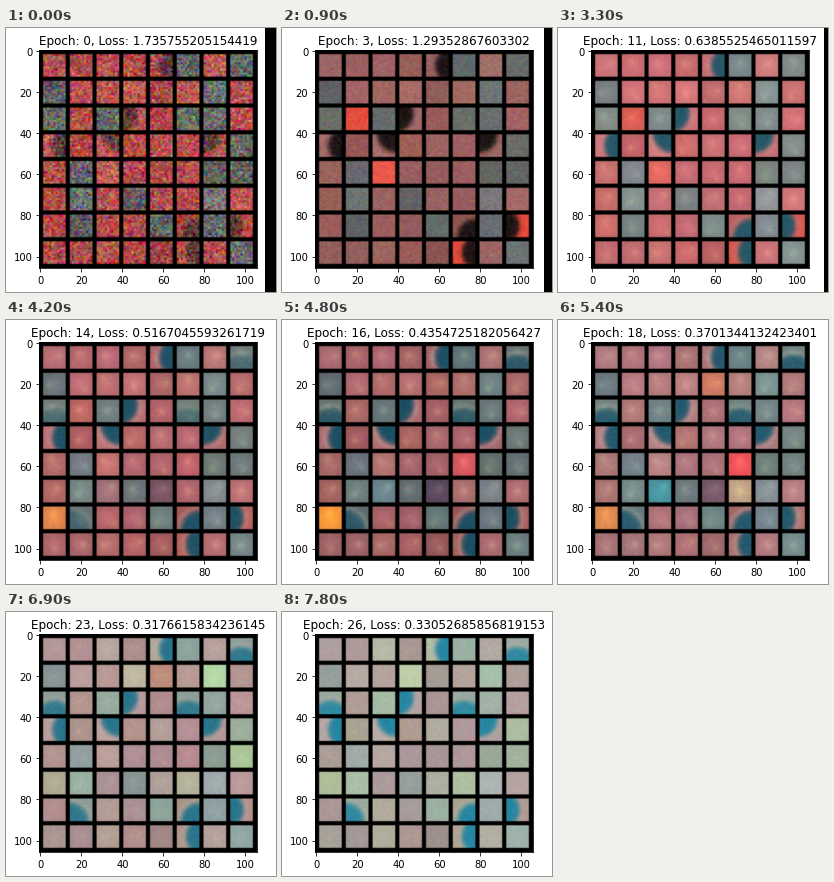
These frames come from a looping animation (270 px wide and 264 px high, 8000 ms). A matplotlib script:

```python
import numpy as np
import matplotlib.pyplot as plt
from matplotlib.animation import FuncAnimation
from matplotlib.colors import to_rgb
from matplotlib.patches import Rectangle
from matplotlib.transforms import ScaledTranslation

W, H = 270, 264
GRID, CELL, PAD = 8, 11, 2
SIZE = GRID * (CELL + PAD) + PAD

EPOCHS = [0, 3, 8, 11, 16, 20, 26]
LOSSES = [1.735755205154419, 1.29352867603302, 0.7954289317131042,
          0.6385525465011597, 0.4354725182056427, 0.3047963082790375,
          0.33052685856819153]

# Colours at each of EPOCHS; cells are named by row and column.
RED = "#b5524e #9c6360 #a06969 #cb7174 #a9686b #b88a8d #ae9c9a".split()
GRAY = "#696766 #696b6b #747b7b #838b8b #6b7779 #7f9294 #9aa6a2".split()
DARK = "#3a3030 #1e1515 #36505a #265868 #1c4f63 #2c6478 #2686a2".split()
GRAY_CELLS = "05 07 10 16 20 22 25 26 37 41 46 47 51 53 56 61 64 66 77".split()
HOT_CELLS = "21 42 67 75".split()

# Side from which a dark disc reaches into the cell, in degrees (y down).
EARLY_DISCS = {"04": 0, "23": 200, "30": 0, "32": -45, "36": -135,
               "65": 45, "67": 180, "75": 0}
LATE_DISCS = {"07": 90, "20": 90, "25": 90, "61": 135}

# Cells that flare up for a while: colour and epoch of the peak.
FLARES = {"60": ("#ffa040", 16), "54": ("#5f4a5c", 16), "45": ("#f05a5c", 18),
          "52": ("#4d98a0", 18), "14": ("#f28260", 20), "55": ("#d8c88c", 20),
          "16": ("#b0cc9c", 23), "47": ("#b0cc9c", 23)}

rng = np.random.default_rng(7)
NOISE = rng.normal(size=(GRID, GRID, CELL, CELL, 3))
TINT = rng.normal(0, 0.02, (GRID, GRID, 1)) + rng.normal(0, 0.012, (GRID, GRID, 3))
SPOT = rng.uniform(2, 8, (GRID, GRID, 2))
GREENING = rng.random((GRID, GRID)) ** 3
YY, XX = np.mgrid[:CELL, :CELL]


def blob(cx, cy, spread):
    return np.exp(-((XX - cx) ** 2 + (YY - cy) ** 2) / spread)[..., None]


def mix(cell, colour, weight):
    return cell + weight * (np.array(to_rgb(colour)) - cell)


def track_colour(track, epoch):
    channels = zip(*map(to_rgb, track))
    return np.array([np.interp(epoch, EPOCHS, c) for c in channels])


def add_disc(cell, angle, strength, epoch):
    """Blend in a dark disc with a pale rim that appears as training goes on."""
    cx, cy = (5 + 7.5 * f(np.radians(angle)) for f in (np.cos, np.sin))
    depth = (8.5 - np.hypot(XX - cx, YY - cy))[..., None]
    rim = np.exp(-(depth + 1.5) ** 2) * np.interp(epoch, [8, 16], [0, 0.3])
    cell = mix(cell, "#c8b0a4", rim * strength)
    mask = strength / (1 + np.exp(-depth / 0.6))
    return mix(cell, track_colour(DARK, epoch), mask)


def draw_cell(row, col, epoch):
    name = f"{row}{col}"
    track = GRAY if name in GRAY_CELLS else RED
    cell = np.ones((CELL, CELL, 3)) * track_colour(track, epoch)
    if name in HOT_CELLS:
        cell = mix(cell, "#ea4a40", np.interp(epoch, [0, 3, 11, 15], [0, 0.9, 0.5, 0]))
    if name in FLARES:
        colour, peak = FLARES[name]
        cell = mix(cell, colour, np.exp(-((epoch - peak) / 3) ** 2))
    cell = mix(cell, "#b4c8a4", GREENING[row, col] * np.interp(epoch, [19, 26], [0, 1]))

    # A soft glow and a yellowish spot peak around the middle of training.
    late = np.exp(-((epoch - 15) / 7) ** 2)
    cell = cell * (1 + 0.15 * late * (blob(5, 5, 20) - 0.5))
    cell += late * blob(*SPOT[row, col], 3) * np.array([0.05, 0.08, 0.03])
    cell += TINT[row, col]

    if name in EARLY_DISCS:
        strength = np.interp(epoch, [0, 2], [0.7, 1])
        cell = add_disc(cell, EARLY_DISCS[name], strength, epoch)
    elif name in LATE_DISCS:
        strength = np.interp(epoch, [11, 17], [0, 0.9])
        cell = add_disc(cell, LATE_DISCS[name], strength, epoch)
    grain = 0.015 + 0.105 * np.exp(-epoch / 1.5)
    return cell + grain * NOISE[row, col]


def draw_filters(epoch):
    image = np.zeros((SIZE, SIZE, 3))
    for row in range(GRID):
        for col in range(GRID):
            y, x = (PAD + k * (CELL + PAD) for k in (row, col))
            image[y:y + CELL, x:x + CELL] = draw_cell(row, col, epoch)
    return image.clip(0, 1)


def strip_start(epoch):
    """Left edge of the black band, which only ever shrinks."""
    return 259 if epoch < 1 else 262 if epoch < 10 else 266 if epoch < 13 else W


plt.rcParams.update({"font.family": "DejaVu Sans", "font.size": 10})
fig = plt.figure(figsize=(W / 72, H / 72), dpi=72, facecolor="white")
side = 217.44
ax = fig.add_axes([33.28 / W, 24.2 / H, side / W, side / H])
pictures = [draw_filters(epoch) for epoch in range(27)]
picture = ax.imshow(pictures[0], interpolation="antialiased")
ax.set_xticks(range(0, 101, 20))
ax.set_yticks(range(0, 101, 20))
title = ax.set_title("", fontsize=12)
strip = fig.add_artist(Rectangle((0, 0), W, H, color="black", lw=0,
                                 transform=None))

# All text sits a little below its usual place.
lower = ScaledTranslation(0, -0.84 / 72, fig.dpi_scale_trans)
for text in [title, *ax.get_xticklabels(), *ax.get_yticklabels()]:
    text.set_transform(text.get_transform() + lower)


def update(frame):
    epoch = frame // 3
    loss = float(np.float32(np.interp(epoch, EPOCHS, LOSSES)))
    picture.set_data(pictures[epoch])
    title.set_text(f"Epoch: {epoch}, Loss: {loss}")
    strip.set_x(strip_start(epoch))
    return picture, title, strip


anim = FuncAnimation(fig, update, frames=80, interval=100, repeat=True,
                     repeat_delay=0, blit=False)
plt.show()
```
